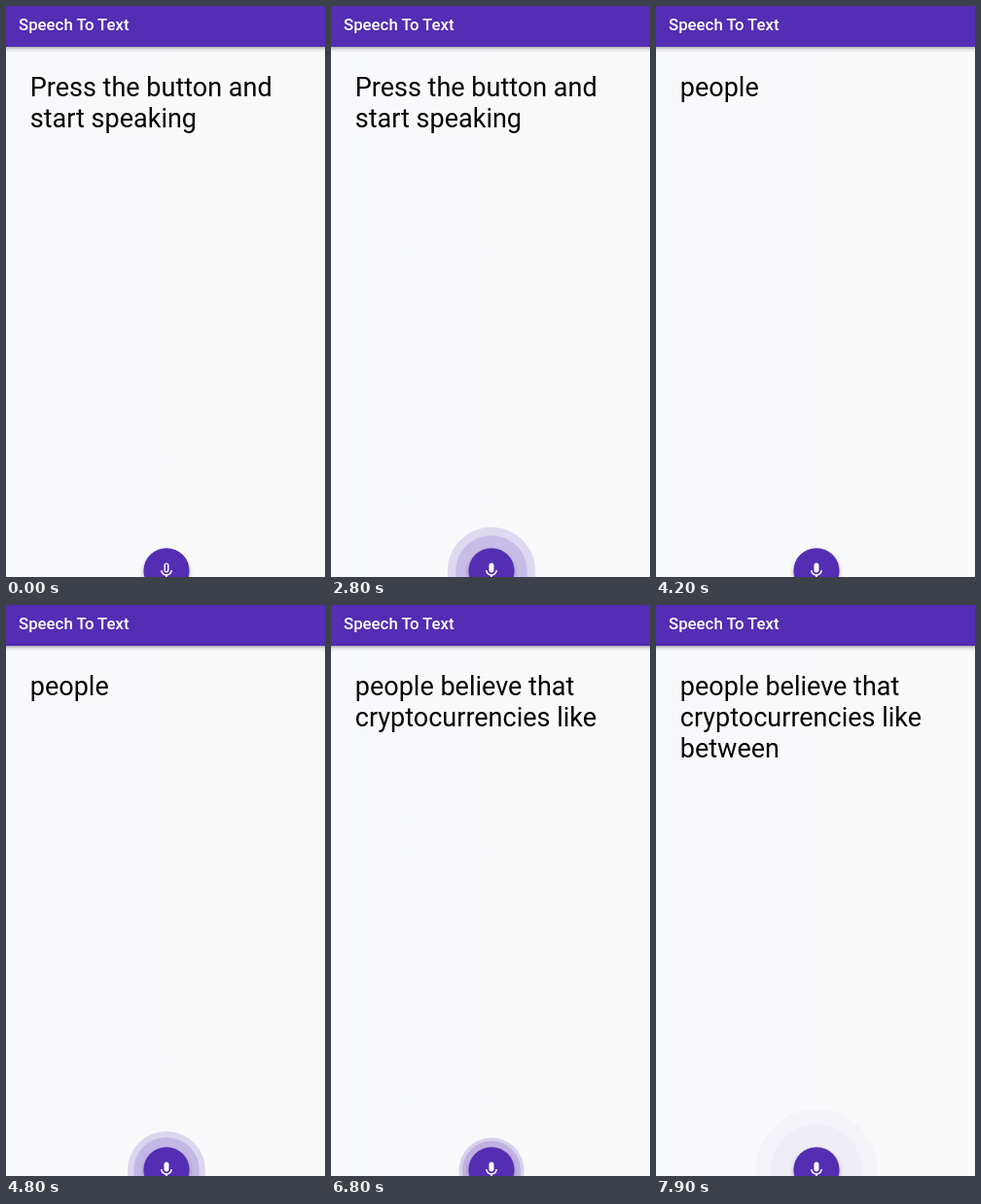
An HTML page for the animation above (8000 ms loop, 328x588 px).

```html
<!DOCTYPE html>
<html lang="en">
<head>
<meta charset="utf-8">
<title>Speech To Text</title>
<style>
  html, body { margin: 0; width: 100%; height: 100%; overflow: hidden; background: #fafafa; }
  svg { display: block; width: 328px; height: 588px; }
  text { font-family: Roboto, Arial, sans-serif; white-space: pre; }
  .title { font-size: 16.8px; font-weight: 500; fill: #fff; }
  .speech { font-size: 27px; fill: #050505; }
</style>
</head>
<body>
<svg viewBox="0 0 328 588" xmlns="http://www.w3.org/2000/svg">
  <defs>
    <linearGradient id="page">
      <stop offset="0" stop-color="#f8f9fc"/>
      <stop offset="1" stop-color="#fafafa"/>
    </linearGradient>
    <linearGradient id="shade" x2="0" y2="1">
      <stop offset="0" stop-color="#000" stop-opacity=".32"/>
      <stop offset=".4" stop-color="#000" stop-opacity=".1"/>
      <stop offset="1" stop-color="#000" stop-opacity="0"/>
    </linearGradient>
    <filter id="lift" x="-30%" y="-30%" width="160%" height="160%">
      <feDropShadow dx="0" dy="2.5" stdDeviation="2" flood-opacity=".28"/>
    </filter>
  </defs>
  <rect width="328" height="588" fill="url(#page)"/>
  <rect y="42" width="328" height="6" fill="url(#shade)"/>
  <rect width="328" height="42" fill="#532db3"/>
  <text class="title" x="13" y="25.3">Speech To Text</text>
  <g id="speech">
    <text class="speech" x="24.8" y="93"></text>
    <text class="speech" x="24.8" y="125"></text>
    <text class="speech" x="24.8" y="157"></text>
  </g>
  <g fill="#532db3">
    <circle id="bigGlow" cx="165" cy="582"/>
    <circle id="smallGlow" cx="165" cy="582"/>
    <circle cx="165" cy="581.8" r="23.6" filter="url(#lift)"/>
  </g>
  <path id="mic" fill="#fff" fill-rule="evenodd" transform="translate(154.9 571.7) scale(.84)"/>
</svg>
<script>
  const LOOP = 8000;
  const LISTEN_AT = 1885;
  const PULSE = 2000, PERIOD = 2095;
  const GLOW_RADIUS = 63;

  const MIC = "M12 14c1.66 0 2.99-1.34 2.99-3L15 5c0-1.66-1.34-3-3-3S9 3.34 9 5v6c0 1.66 1.34 3 3 3z" +
    "m5.3-3c0 3-2.54 5.1-5.3 5.1S6.7 14 6.7 11H5c0 3.41 2.72 6.23 6 6.72V21h2v-3.28c3.28-.48 6-3.3 6-6.72h-1.7z";
  const MIC_HOLE = "M10.8 4.9c0-.66.54-1.2 1.2-1.2s1.2.54 1.2 1.2l-.01 6.2c0 .66-.53 1.2-1.19 1.2s-1.2-.54-1.2-1.2z";

  const phrases = [
    [0, "Press the button and\nstart speaking"],
    [3800, "people"],
    [5000, "people believe"],
    [5300, "people believe that"],
    [6000, "people believe that\ncryptocurrencies"],
    [6400, "people believe that\ncryptocurrencies like"],
    [7400, "people believe that\ncryptocurrencies like\nbetween"]
  ];

  const byId = id => document.getElementById(id);
  const lines = [...byId("speech").children];
  const mic = byId("mic"), bigGlow = byId("bigGlow"), smallGlow = byId("smallGlow");

  // cubic-bezier(.4, 0, .2, 1), solved by bisection
  function ease(x) {
    let lo = 0, hi = 1, s = 0.5;
    for (let i = 0; i < 24; i++) {
      s = (lo + hi) / 2;
      const q = 1 - s;
      if (1.2 * s * q * q + 0.6 * s * s * q + s * s * s < x) lo = s; else hi = s;
    }
    return s * s * (3 - 2 * s);
  }

  function setGlow(circle, radius, alpha) {
    circle.setAttribute("r", radius);
    circle.setAttribute("fill-opacity", alpha);
  }

  function draw(time) {
    const listening = time >= LISTEN_AT;
    const p = listening ? Math.min(1, (time - LISTEN_AT) % PERIOD / PULSE) : 1;
    const grow = ease(p);
    const alpha = 0.3 * (1 - p);
    setGlow(bigGlow, GLOW_RADIUS * grow, alpha);
    setGlow(smallGlow, GLOW_RADIUS * (1 / 6 + grow * 7 / 12), alpha);
    mic.setAttribute("d", listening ? MIC : MIC + MIC_HOLE);

    const words = phrases.filter(([at]) => at <= time).pop()[1].split("\n");
    lines.forEach((line, i) => { line.textContent = words[i] || ""; });
  }

  const start = performance.now();
  function tick() {
    draw((performance.now() - start) % LOOP);
    requestAnimationFrame(tick);
  }
  tick();
</script>
</body>
</html>
```
